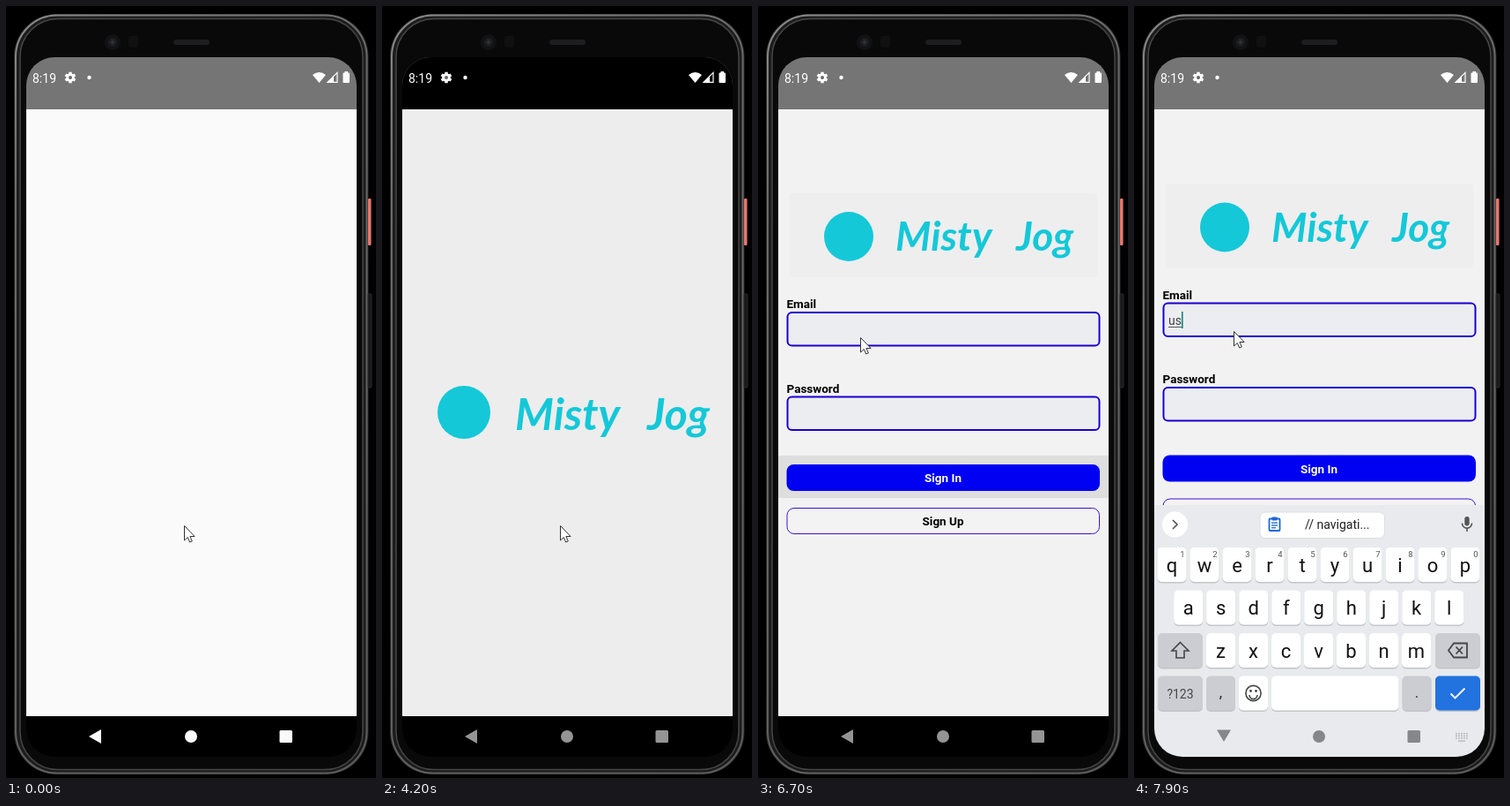
Animation of 420x874 px, one loop 8 s. Source, as an HTML page with a canvas:

```html
<!DOCTYPE html>
<html lang="en">
<head>
<meta charset="utf-8">
<title>Phone sign-in</title>
<style>
  html, body { margin: 0; width: 100%; height: 100%; overflow: hidden; background: #000; }
  canvas { display: block; width: 420px; height: 874px; }
</style>
</head>
<body>
<canvas id="stage"></canvas>
<script>
const W = 420, H = 874, LOOP = 8000, STEP = 100;
const canvas = document.getElementById('stage');
const c = canvas.getContext('2d');
const dpr = window.devicePixelRatio || 1;
canvas.width = W * dpr;
canvas.height = H * dpr;

const CYAN = '#14c8d8', BLUE = '#0000f2', EDGE = '#1a00d0';
const UI = 'Roboto, Arial, sans-serif';

const clamp = v => Math.max(0, Math.min(1, v));
const span = (t, a, b) => clamp((t - a) / (b - a));
const mix = (a, b, p) => a + (b - a) * p;

function rect(x, y, w, h, color) {
  c.fillStyle = color;
  c.fillRect(x, y, w, h);
}
function box(x, y, w, h, r, fill, stroke, lw = 1) {
  c.beginPath();
  c.roundRect(x, y, w, h, r);
  if (fill) { c.fillStyle = fill; c.fill(); }
  if (stroke) { c.strokeStyle = stroke; c.lineWidth = lw; c.stroke(); }
}
function disc(x, y, r, fill) {
  c.beginPath();
  c.arc(x, y, r, 0, Math.PI * 2);
  c.fillStyle = fill;
  c.fill();
}
function poly(points, fill, stroke, lw = 1, open = false) {
  c.beginPath();
  points.forEach(([x, y], i) => i ? c.lineTo(x, y) : c.moveTo(x, y));
  if (!open) c.closePath();
  if (fill) { c.fillStyle = fill; c.fill(); }
  if (stroke) { c.strokeStyle = stroke; c.lineWidth = lw; c.stroke(); }
}
function text(s, x, y, size, color, { weight = 400, align = 'left', style = '', font = UI } = {}) {
  c.font = `${style} ${weight} ${size}px ${font}`;
  c.textAlign = align;
  c.fillStyle = color;
  c.fillText(s, x, y);
}

function phone() {
  rect(0, 0, W, H, '#000');
  const rim = c.createLinearGradient(9, 9, 412, 870);
  rim.addColorStop(0, '#8c8c8c');
  rim.addColorStop(0.2, '#6a6a6a');
  rim.addColorStop(1, '#5c5c5c');
  box(9, 9, 402.5, 861, 48, '#262626');
  box(11, 10.5, 398.5, 858, 47, '#1c1c1d', rim, 2);
  box(16, 14.5, 389, 850, 43, '#09090a', '#464647', 1.5);
  box(411, 326, 4, 106, 1, '#191919', '#2a2a2a');
  box(411, 218, 3.5, 53, 1, '#e8766c');
  box(190, 38, 41, 6, 3, '#1e1e20');
  disc(121, 41, 9, '#121214');
  disc(121, 41, 5, '#1d1e21');
  disc(121, 41, 2, '#303236');
  box(139, 34, 11, 13, 3, '#101011');
}

function wordmark(x, y, size, gap) {
  const opt = { weight: 700, style: 'italic', font: 'Lato, Arial, sans-serif' };
  text('Misty', x, y, size, CYAN, opt);
  text('Jog', x + gap, y, size, CYAN, opt);
}

function statusIcons() {
  text('8:19', 30, 87, 14, '#fff');
  c.save();
  c.translate(73, 81);
  for (let i = 0; i < 3; i++) {
    c.rotate(Math.PI / 3);
    rect(-1.7, -6.3, 3.4, 12.6, '#fff');
  }
  c.beginPath();
  c.arc(0, 0, 3.5, 0, 7);
  c.strokeStyle = '#fff';
  c.lineWidth = 2.6;
  c.stroke();
  c.restore();
  disc(73, 81, 2, '#666');
  disc(94.5, 81, 2.2, '#fff');

  c.beginPath();
  c.moveTo(355.5, 87);
  c.lineTo(348, 78);
  c.quadraticCurveTo(355.5, 72, 363, 78);
  c.closePath();
  c.fillStyle = '#fff';
  c.fill();
  poly([[365, 86.4], [376, 75.4], [376, 86.4]], null, '#fff', 1.2);
  poly([[365, 86.4], [372, 79.4], [372, 86.4]], '#fff');
  box(382.5, 75.5, 7.5, 11.5, 1, '#fff');
  rect(384.5, 74, 3.5, 2, '#fff');
}

function navIcons(color, down) {
  poly(down ? [[94, 819.5], [110, 819.5], [102, 833]] : [[94, 827], [108, 819], [108, 835]], color);
  disc(210, 827, 7, color);
  box(310.5, 820, 14.5, 14, 1.5, color);
}

function cursor(x, y) {
  const shape = [[0, 0], [0, 16.5], [3.8, 13], [6.2, 18.5], [8.8, 17.4], [6.4, 12], [11.6, 12]];
  poly(shape.map(([a, b]) => [x + a + 0.5, y + b + 0.5]), '#fff', '#333', 1);
}

function splash(alpha) {
  c.globalAlpha = alpha;
  rect(23, 58, 375, 59, '#000');
  rect(23, 117, 375, 687, '#ededed');
  disc(93, 460, 30, CYAN);
  wordmark(151, 480, 50, 150);
  c.globalAlpha = 1;
}

function field(label, y, fill) {
  text(label, 32.5, y - 4, 13.5, '#000', { weight: 700 });
  box(33.5, y + 1, 354, 37.5, 5, fill, EDGE, 2);
}

function form(t, shift) {
  c.save();
  c.translate(0, -shift);
  box(36, 212, 349, 95, 4, '#eeeeef');
  disc(103, 261, 28, CYAN);
  wordmark(156, 277, 46, 137);
  field('Email', 346, '#ebedf1');
  field('Password', 441.5, '#ebedf1');
  const center = { weight: 700, align: 'center' };
  if (t >= 6400 && t < 6900) rect(23, 509, 375, 48, '#dedede');
  box(32.5, 519, 355.5, 30, 8, BLUE);
  text('Sign In', 210, 539, 13.5, '#fff', center);
  box(33, 568.5, 354.5, 29, 8, '#f3f3f3', '#3a14cc', 1);
  text('Sign Up', 210, 588, 13.5, '#000', center);
  c.restore();
}

function typing(t) {
  if (t < 7000) return;
  const y = t >= 7300 ? 361 : 371;
  const typed = t >= 7800 ? 'us' : t >= 7600 ? 'u' : '';
  text(typed, 39, y, 14, '#444');
  const w = c.measureText(typed).width;
  if (w) rect(39, y + 2, w, 1, '#555');
  rect(39 + w, y - 15, 1.7, 19, '#168a82');
}

function key(x, y, w, fill = '#fff') {
  box(x, y + 1, w, 39.5, 5, '#c3c5c9');
  box(x, y, w, 39, 5, fill);
}

function toolbar() {
  disc(46.5, 587, 14.5, '#fff');
  poly([[44, 582], [49, 587], [44, 592]], null, '#555', 1.7, true);
  box(143, 573, 141.5, 29.5, 6, '#fff', '#dcdee2', 1);
  box(153.5, 580.5, 12, 13.5, 1, '#fff', '#1a66d8', 1.8);
  box(156.5, 578.5, 6, 4, 1, '#1a66d8');
  for (let i = 0; i < 3; i++) rect(156, 584.5 + i * 2.8, i < 2 ? 7 : 5, 1.3, '#1a66d8');
  text('// navigati...', 194, 592, 14, '#222');
  box(375.3, 578, 5.4, 10.5, 2.7, '#555');
  c.beginPath();
  c.arc(378, 585.5, 5.6, 0, Math.PI);
  c.strokeStyle = '#555';
  c.lineWidth = 1.6;
  c.stroke();
  rect(377.2, 591, 1.6, 4, '#555');
}

function keyboard(top, caps) {
  const GRAY = '#cbcdd2', INK = '#454648';
  c.save();
  c.translate(0, top - 565);
  rect(23, 565, 375, 290, '#e8eaed');
  toolbar();
  const rows = [['qwertyuiop', 43, 613], ['asdfghjkl', 61.7, 661.5], ['zxcvbnm', 98.5, 710]];
  for (const [letters, x0, y] of rows) {
    [...letters].forEach((ch, i) => {
      const x = x0 + i * 37;
      key(x - 16.5, y, 33);
      text(caps ? ch.toUpperCase() : ch, x, y + 27.5, 22, '#111', { align: 'center' });
      if (y === 613) text((i + 1) % 10, x + 12, y + 11, 9.5, '#555', { align: 'center' });
    });
  }

  key(27, 710, 51, GRAY);
  poly([[52.5, 720.5], [62, 730], [57, 730], [57, 738], [48, 738], [48, 730], [43, 730]],
    caps ? INK : null, INK, 1.6);
  key(342, 710, 51, GRAY);
  poly([[357, 729.5], [363, 721.5], [378, 721.5], [378, 737.5], [363, 737.5]], null, INK, 1.8);
  poly([[365.5, 725.5], [373, 733.5]], null, INK, 1.8);
  poly([[373, 725.5], [365.5, 733.5]], null, INK, 1.8);

  key(27, 758.5, 51, GRAY);
  text('?123', 52.5, 783.5, 14, INK, { align: 'center' });
  key(82, 758.5, 33, GRAY);
  text(',', 98.5, 783, 17, '#222', { align: 'center' });
  key(119, 758.5, 33);
  c.beginPath();
  c.arc(135.5, 778, 8.6, 0, Math.PI * 2);
  c.moveTo(140, 780);
  c.arc(135.5, 780, 4.5, 0, Math.PI);
  c.strokeStyle = INK;
  c.lineWidth = 1.6;
  c.stroke();
  disc(132.5, 775.5, 1.4, INK);
  disc(138.5, 775.5, 1.4, INK);
  key(156, 758.5, 144.5);
  key(304.5, 758.5, 33, GRAY);
  text('.', 321, 783, 17, '#222', { align: 'center' });
  key(342, 758.5, 51, '#2272e0');
  poly([[359.5, 778.5], [364.5, 783.5], [375.5, 772.5]], null, '#fff', 1.9, true);
  c.restore();
}

function switchIcon() {
  for (let r = 0; r < 3; r++)
    for (let i = 0; i < 5; i++) rect(365 + i * 3, 823 + r * 2.6, 1.8, 1.5, '#b2b4b8');
  rect(368, 831.5, 8, 1.3, '#b2b4b8');
}

// Pointer stops: time, x, y.
const stops = [[5500, 202, 588], [5800, 191, 593], [6100, 191, 593], [6600, 116, 375],
  [6900, 116, 375], [7200, 113, 368]];

function pointer(t) {
  let at = stops[0];
  for (const next of stops) {
    if (t < next[0]) {
      const p = span(t, at[0], next[0]);
      return [mix(at[1], next[1], p), mix(at[2], next[2], p)];
    }
    at = next;
  }
  return [at[1], at[2]];
}

function draw(t) {
  c.setTransform(dpr, 0, 0, dpr, 0, 0);
  phone();

  const signIn = t >= 6200;
  c.save();
  c.beginPath();
  c.roundRect(23, 58, 375, 792, 32);
  c.clip();
  rect(23, 58, 375, 59, '#757575');
  rect(23, 117, 375, 687, signIn ? '#f2f2f2' : '#fafafa');
  rect(23, 804, 375, 46, '#000');

  const shown = span(t, 900, 1400);
  const fade = shown * (1 - span(t, 5680, 6080));
  if (fade > 0) splash(fade);

  if (signIn) {
    c.save();
    c.beginPath();
    c.rect(23, 117, 375, (t >= 7300 ? 565 : 804) - 117);
    c.clip();
    form(t, t >= 7300 ? 10.5 : 0);
    typing(t);
    c.restore();
  }

  const slide = span(t, 7050, 7420);
  if (slide > 0) {
    if (t >= 7300) rect(23, 565, 375, 239, '#fafafa');
    keyboard(850 - 285 * (1 - (1 - slide) ** 3), t < 7600);
    switchIcon();
  }
  statusIcons();
  const g = Math.round(mix(250, 148, shown));
  navIcons(slide > 0 ? '#85878a' : `rgb(${g},${g},${g})`, t >= 7400);
  c.restore();

  cursor(...pointer(t));
}

const start = performance.now();
function tick() {
  const t = (performance.now() - start) % LOOP;
  draw(Math.floor(t / STEP) * STEP);
  requestAnimationFrame(tick);
}
tick();
</script>
</body>
</html>
```
